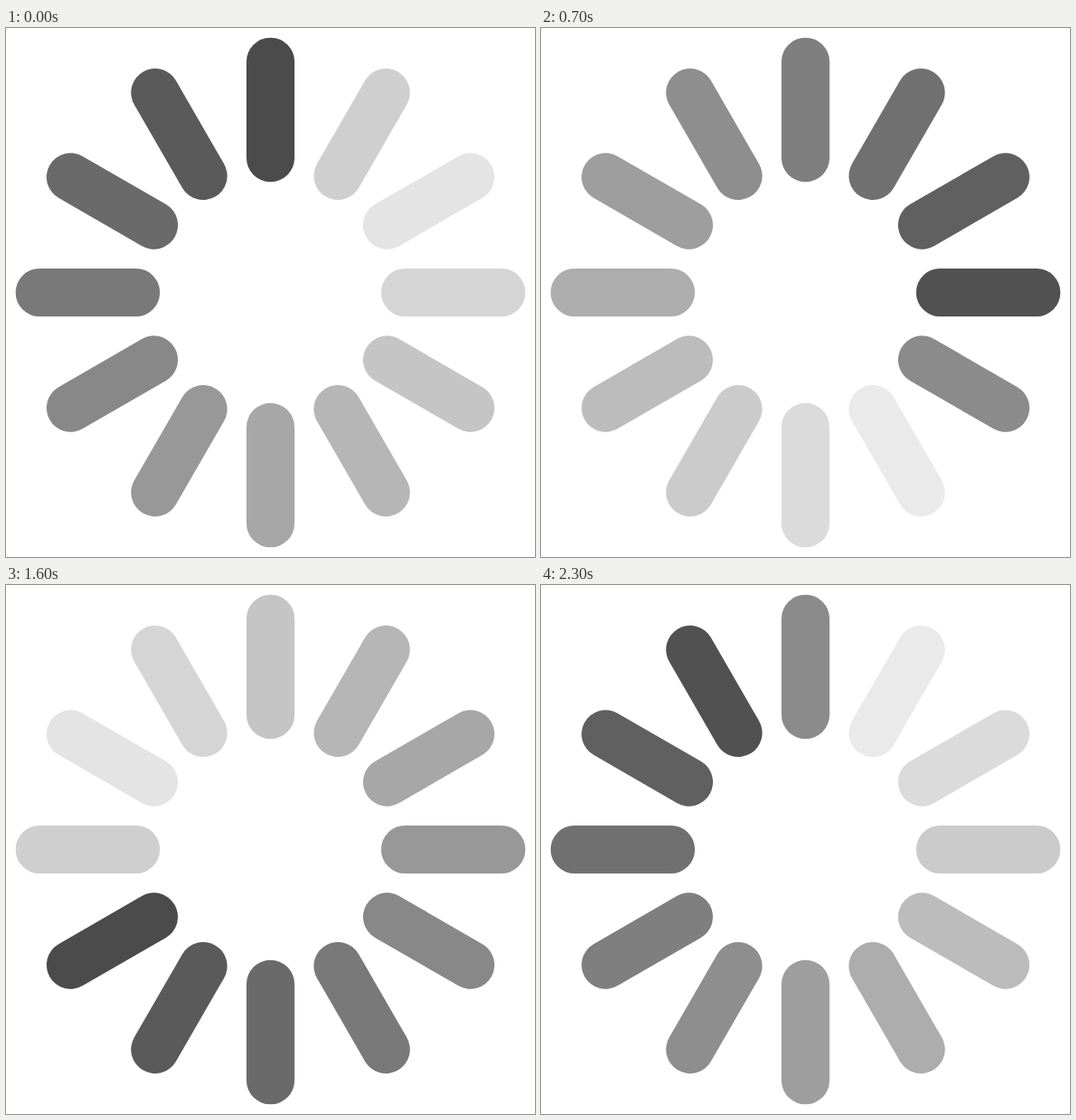
Animation, 640 px wide and 640 px high, one loop 2.4 s. Source, as an HTML page:

```html
<!DOCTYPE html>
<html lang="en">
<head>
<meta charset="utf-8">
<title>Loading spinner</title>
<style>
  html, body { margin: 0; height: 100%; overflow: hidden; background: #fff; }
  svg { display: block; width: 100%; height: 100%; }
  line { stroke-width: 2; stroke-linecap: round; }
</style>
</head>
<body>
<svg viewBox="-11 -11 22 22"></svg>
<script>
const BARS = 12, STEP_MS = 100, STEPS = 24;
const svg = document.querySelector('svg');

const bars = Array.from({ length: BARS }, (_, i) => {
  const bar = document.createElementNS(svg.namespaceURI, 'line');
  bar.setAttribute('y1', -9.6);
  bar.setAttribute('y2', -5.6);
  bar.setAttribute('transform', `rotate(${i * 360 / BARS})`);
  return svg.appendChild(bar);
});

// Slow linear fade after the peak, then a quick darkening before the next one.
function gray(age) {
  if (age === 22) return 207;
  if (age === 23) return 139;
  return Math.round((age % 2 ? 81 : 75) + 15.3 * Math.floor(age / 2));
}

function draw(now) {
  const step = Math.floor(now / STEP_MS) % STEPS;
  bars.forEach((bar, i) => {
    const g = gray((step - 2 * i + STEPS) % STEPS);
    bar.setAttribute('stroke', `rgb(${g},${g},${g})`);
  });
}

const start = performance.now();
function tick() {
  draw(performance.now() - start);
  requestAnimationFrame(tick);
}
tick();
</script>
</body>
</html>
```
